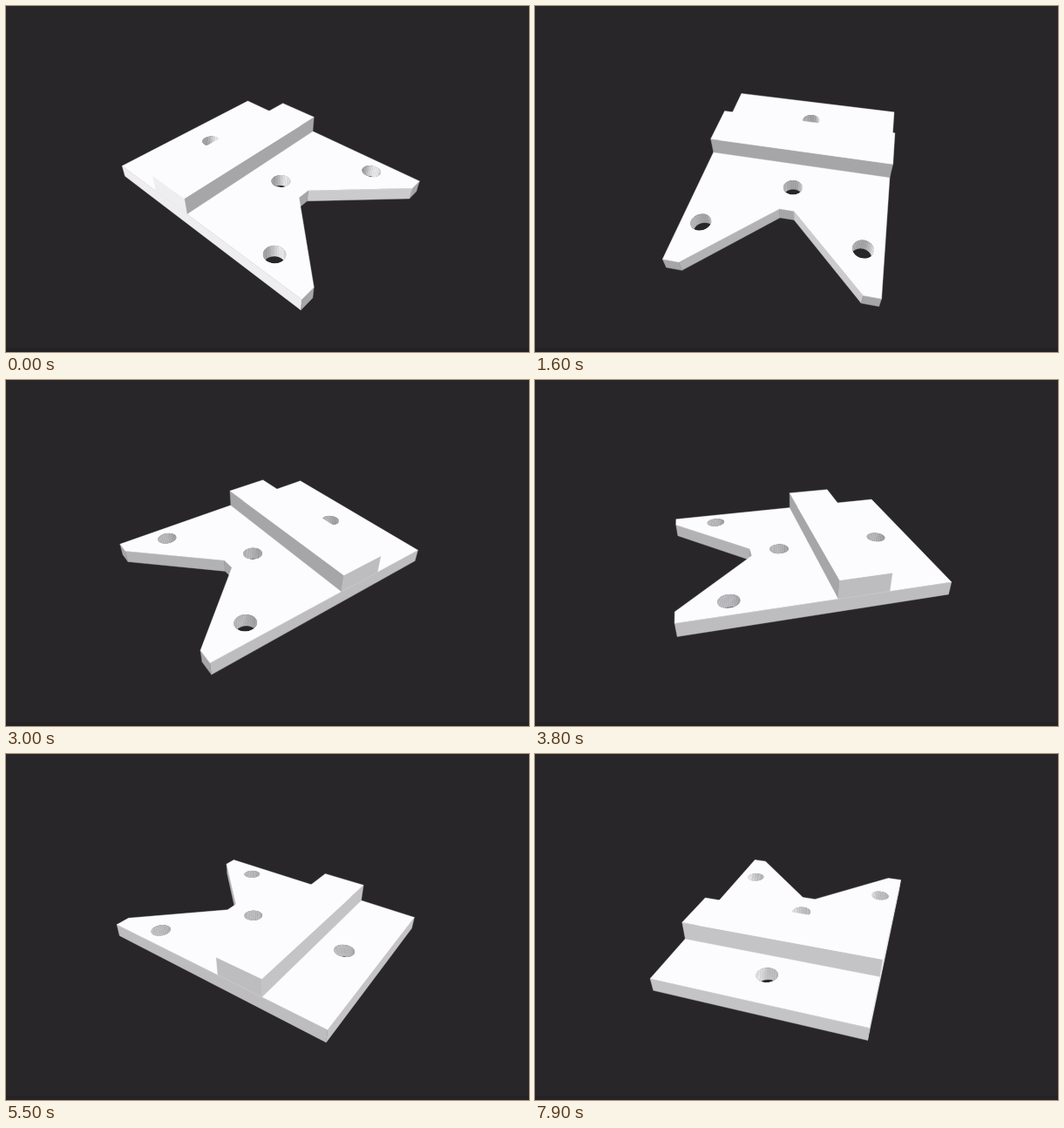
An HTML page with a canvas that plays this animation: 600 px wide and 397 px high, repeating every 8 s.

```html
<!DOCTYPE html>
<html lang="en">
<head>
<meta charset="utf-8">
<title>Rotating bracket</title>
<style>
html, body { margin: 0; width: 100%; height: 100%; overflow: hidden; background: #282629; }
canvas { display: block; }
</style>
</head>
<body>
<canvas id="stage" width="600" height="397"></canvas>
<script>
const ctx = document.getElementById('stage').getContext('2d');
const LOOP = 8000, STEP = 100;
const BG = '#282629', WHITE = '#fcfbfd';
const FOCAL = 479.2, DIST = 185, CX = 300, CY = 199.3;

// Part size: half width, half length, leg tip width, heights
const W = 40, L = 51.5, TIP = 6.3, TOP = 3.6, BOTTOM = -2.3, RIDGE = 11.8;
const RADIUS = 4.1;

// The plate is symmetric about x = 0
const mirror = pts => [...pts, ...pts.map(([x, y]) => [-x, y]).reverse()];
const OUTLINE = mirror([[W, -L], [W, L], [W - TIP, L], [3, 20.2]]);
const RIDGE_BOX = mirror([[W, -26], [W, -6]]);
const HOLES = [[0, -37.2], [0, 7.8], [-32, 32.7], [32, 32.7]];

// Key poses of the orbit: time, turn, elevation in degrees
const POSES = [
  [0, 47.5, 39.6], [500, 29, 50.3], [1000, 9.3, 50.8], [2300, -33.8, 43.4], [3800, -76.5, 31.2],
  [5500, -125.3, 34.2], [6000, -141, 37], [6600, -163, 34.9], [7900, -197, 34.9]
];

let cosT, sinT, cosE, sinE;

function slope(i, k) {
  const a = POSES[Math.max(i - 1, 0)], b = POSES[Math.min(i + 1, POSES.length - 1)];
  return (b[k] - a[k]) / (b[0] - a[0]);
}

// Smooth cubic through the key poses
function sample(t, k) {
  let i = 0;
  while (i < POSES.length - 2 && t >= POSES[i + 1][0]) i++;
  const a = POSES[i], b = POSES[i + 1], d = b[0] - a[0], u = (t - a[0]) / d, v = 1 - u;
  return v * v * (1 + 2 * u) * a[k] + u * u * (1 + 2 * v) * b[k]
    + u * v * d * (v * slope(i, k) - u * slope(i + 1, k));
}

function aim(t) {
  const turn = sample(t, 1) * Math.PI / 180, elev = sample(t, 2) * Math.PI / 180;
  cosT = Math.cos(turn); sinT = Math.sin(turn);
  cosE = Math.cos(elev); sinE = Math.sin(elev);
}

const away = (x, y) => x * sinT - y * cosT;

function project([x, y], z) {
  const f = away(x, y), k = FOCAL / (DIST + f * cosE - z * sinE);
  return [CX + (x * cosT + y * sinT) * k, CY - (f * sinE + z * cosE) * k];
}

function trace(points) {
  ctx.beginPath();
  points.forEach(p => ctx.lineTo(p[0], p[1]));
  ctx.closePath();
}

function fill(points, colour) {
  trace(points);
  ctx.fillStyle = ctx.strokeStyle = colour;
  ctx.lineWidth = 0.4;
  ctx.fill();
  ctx.stroke();
}

// Twice the signed area; positive when the wall faces the viewer
function area(pts) {
  return pts.reduce((sum, p, i) => {
    const q = pts[(i + 1) % pts.length];
    return sum + p[0] * q[1] - q[0] * p[1];
  }, 0);
}

// Grey of an upright wall with unit normal (nx, ny)
function shade(nx, ny) {
  const v = Math.round((nx > 0 ? 189 : 238) * nx * nx + (ny > 0 ? 166 : 196) * ny * ny);
  return `rgb(${v},${v - 1},${v + 2})`;
}

function walls(base, low, high) {
  base.map((p, i) => {
    const q = base[(i + 1) % base.length];
    const dx = q[0] - p[0], dy = q[1] - p[1], len = Math.hypot(dx, dy);
    return {
      quad: [project(p, high), project(p, low), project(q, low), project(q, high)],
      colour: shade(dy / len, -dx / len),
      far: away(p[0] + q[0], p[1] + q[1])
    };
  }).filter(w => area(w.quad) > 0)
    .sort((a, b) => b.far - a.far)
    .forEach(w => fill(w.quad, w.colour));
}

function prism(base, low, high) {
  walls(base, low, high);
  fill(base.map(p => project(p, high)), WHITE);
}

function hole([x, y]) {
  // Wound the other way round, so its walls face inwards
  const ring = Array.from({ length: 36 }, (_, i) => {
    const a = -i / 18 * Math.PI;
    return [x + RADIUS * Math.cos(a), y + RADIUS * Math.sin(a)];
  });
  ctx.save();
  trace(ring.map(p => project(p, TOP)));
  ctx.clip();
  ctx.fillStyle = BG;
  ctx.fill();
  walls(ring, BOTTOM, TOP);
  ctx.restore();
}

function draw(t) {
  aim(t);
  ctx.fillStyle = BG;
  ctx.fillRect(0, 0, 600, 397);
  ctx.fillStyle = '#242225';
  ctx.fillRect(0, 392, 600, 5);
  prism(OUTLINE, BOTTOM, TOP);
  HOLES.forEach(hole);
  prism(RIDGE_BOX, TOP, RIDGE);
}

const start = performance.now();
function tick() {
  const t = (performance.now() - start) % LOOP;
  draw(Math.floor(t / STEP) * STEP);
  requestAnimationFrame(tick);
}
tick();
</script>
</body>
</html>
```
